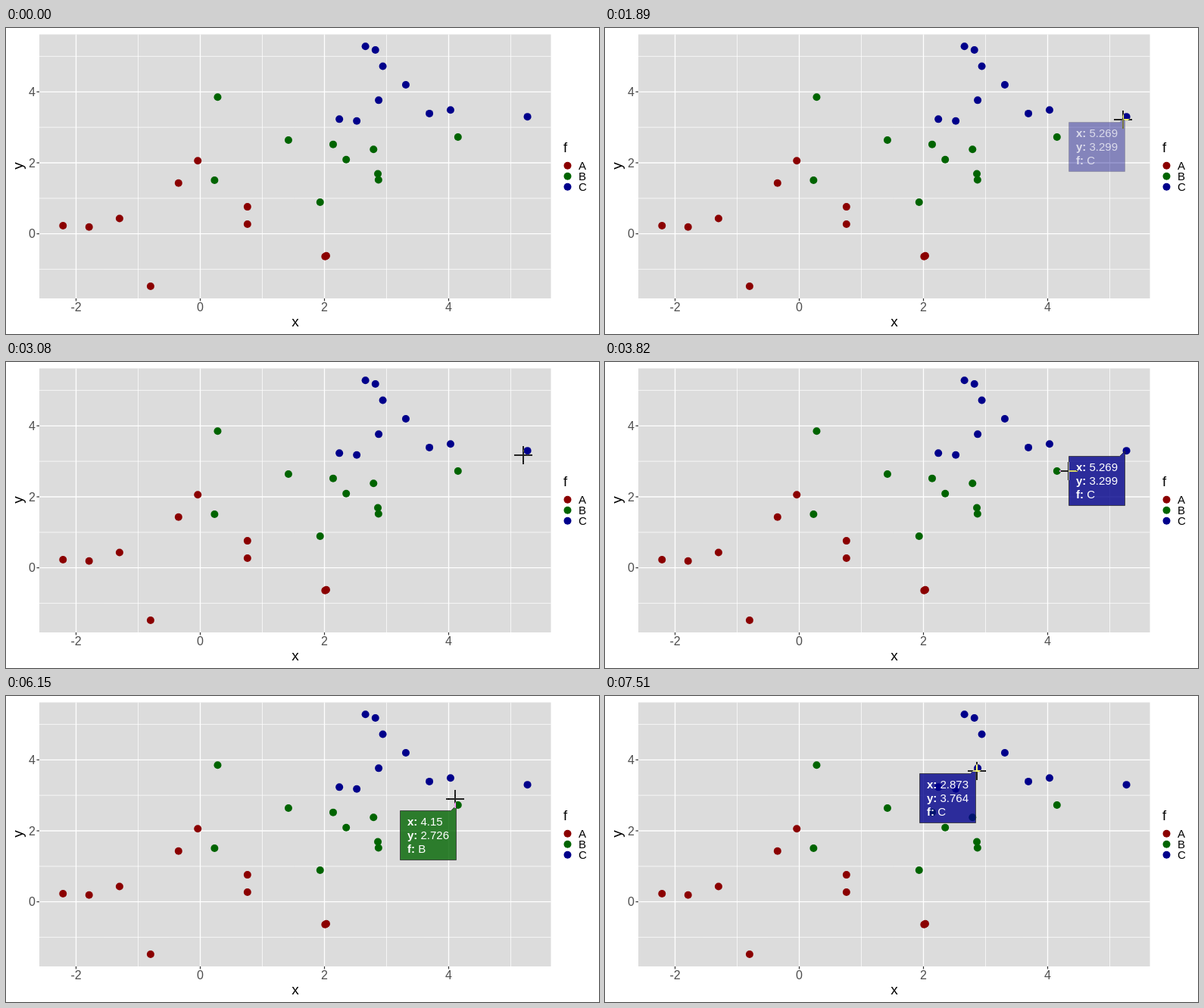
These frames come from a looping animation (783x404 px, 8 s). An HTML page with a canvas:

```html
<!DOCTYPE html>
<html lang="en">
<head>
<meta charset="utf-8">
<title>Scatter plot with tooltips</title>
<style>
html, body { margin: 0; width: 783px; height: 404px; overflow: hidden; background: #fff; }
canvas { display: block; }
</style>
</head>
<body>
<canvas id="stage" width="783" height="404"></canvas>
<script>
const ctx = document.getElementById('stage').getContext('2d');
const LOOP = 8000;
const FONT = '"Liberation Sans", Arial, sans-serif';
const COLORS = { A: '#8b0000', B: '#006400', C: '#00008b' };
const PANEL = { left: 44, right: 719.5, top: 8.5, bottom: 357 };

const scaleX = v => 256.5 + 82 * v;
const scaleY = v => 271.7 - 46.85 * v;

// The plotted observations
const data = {
  A: [[-2.21, .23], [-1.79, .19], [-1.3, .43], [-.8, -1.48], [-.35, 1.43],
      [-.04, 2.06], [.76, .76], [.76, .27], [2.01, -.64], [2.03, -.62]],
  B: [[.28, 3.85], [.23, 1.51], [1.42, 2.64], [2.14, 2.52], [2.35, 2.09],
      [2.79, 2.38], [2.86, 1.69], [2.87, 1.52], [1.93, .89], [4.15, 2.726]],
  C: [[2.66, 5.28], [2.82, 5.18], [2.94, 4.72], [3.31, 4.2], [2.24, 3.23],
      [2.52, 3.18], [3.69, 3.39], [4.03, 3.49], [2.873, 3.764], [5.269, 3.299]]
};

const hovers = [
  { group: 'C', item: 9, on: 1890, off: 2430 },
  { group: 'C', item: 9, on: 3280, off: 4690 },
  { group: 'B', item: 9, on: 4890, off: 7300 },
  { group: 'C', item: 8, on: 7430, off: LOOP }
];

// Each move eases on from where the one before it stopped
const entry = { x: 634, y: 372 };
const moves = [
  { start: 480, end: 1220, x: 674, y: 128 },
  { start: 1290, end: 1430, x: 687, y: 121 },
  { start: 1890, end: 1890, x: 684, y: 121 },
  { start: 2750, end: 2750, x: 683, y: 123 },
  { start: 3150, end: 3820, x: 612, y: 144 },
  { start: 3890, end: 4360, x: 595, y: 137 },
  { start: 6100, end: 6770, x: 488, y: 96 },
  { start: 6970, end: 6970, x: 491, y: 99 }
];

const ease = p => p * p * (3 - 2 * p);

function text(str, x, y, size, color, align = 'left', weight = '') {
  ctx.font = `${weight} ${size}px ${FONT}`;
  ctx.textAlign = align;
  ctx.fillStyle = color;
  ctx.fillText(str, x, y);
}

function line(x1, y1, x2, y2, width, color) {
  ctx.lineWidth = width;
  ctx.strokeStyle = color;
  ctx.beginPath();
  ctx.moveTo(x1, y1);
  ctx.lineTo(x2, y2);
  ctx.stroke();
}

function dot(x, y, color) {
  ctx.fillStyle = color;
  ctx.beginPath();
  ctx.arc(x, y, 5, 0, 2 * Math.PI);
  ctx.fill();
}

function drawPlot() {
  const { left, right, top, bottom } = PANEL;
  ctx.fillStyle = '#fff';
  ctx.fillRect(0, 0, 783, 404);
  ctx.fillStyle = '#dcdcdc';
  ctx.fillRect(left, top, right - left, bottom - top);

  for (let v = -2; v <= 5; v++) {
    const major = v % 2 === 0, width = major ? 1.3 : .7;
    const x = scaleX(v), y = scaleY(v);
    line(x, top, x, bottom, width, '#fff');
    if (v > -2) line(left, y, right, y, width, '#fff');
    if (!major) continue;
    line(x, bottom, x, bottom + 3.5, 1.2, '#333');
    text(v, x, 374, 16, '#4d4d4d', 'center');
    if (v >= 0) {
      line(left - 3.5, y, left, y, 1.2, '#333');
      text(v, 39, y + 5.6, 16, '#4d4d4d', 'right');
    }
  }

  text('x', 382, 394, 19, '#000', 'center');
  ctx.save();
  ctx.translate(22, 182);
  ctx.rotate(-Math.PI / 2);
  text('y', 0, 0, 19, '#000', 'center');
  ctx.restore();

  text('f', 736, 164, 18.5, '#000');
  Object.keys(COLORS).forEach((group, i) => {
    const y = 181.7 + 14 * i;
    dot(741.5, y, COLORS[group]);
    text(group, 756, y + 5.3, 15, '#000');
    data[group].forEach(([vx, vy]) => dot(scaleX(vx), scaleY(vy), COLORS[group]));
  });
}

function drawTooltip({ group, item, on, off }, t) {
  if (t < on || t >= off) return;
  const alpha = t < on + 75 ? .5 : 1;
  const [vx, vy] = data[group][item];
  const x = Math.floor(scaleX(vx) - 1.5), y = Math.round(scaleY(vy));
  const left = x - 74.5, right = x - .5, top = y + 7.5, bottom = y + 72.5;

  ctx.beginPath();
  ctx.moveTo(left, top);
  ctx.lineTo(right - 7, top);
  ctx.lineTo(right, y + .5);
  ctx.lineTo(right, bottom);
  ctx.lineTo(left, bottom);
  ctx.closePath();
  ctx.globalAlpha = .8 * alpha;
  ctx.fillStyle = COLORS[group];
  ctx.fill();
  ctx.globalAlpha = .8 * alpha * alpha;
  ctx.lineWidth = 1;
  ctx.strokeStyle = '#333';
  ctx.stroke();

  // The text comes in ahead of the box
  ctx.globalAlpha = Math.sqrt(alpha);
  Object.entries({ x: vx, y: vy, f: group }).forEach(([name, value], i) => {
    const label = name + ':', baseline = y + 27 + 18 * i;
    text(label, x - 65, baseline, 15, '#fff', 'left', 'bold');
    const width = ctx.measureText(label).width;
    text(' ' + value, x - 65 + width, baseline, 15, '#fff');
  });
  ctx.globalAlpha = 1;
}

// The crosshair inverts whatever lies under it
function drawCursor(t) {
  const i = moves.findLastIndex(move => move.start <= t);
  if (i < 0) return;
  const from = moves[i - 1] || entry, to = moves[i];
  const p = t < to.end ? ease((t - to.start) / (to.end - to.start)) : 1;
  const x = Math.round(from.x + (to.x - from.x) * p);
  const y = Math.round(from.y + (to.y - from.y) * p);
  ctx.globalCompositeOperation = 'difference';
  ctx.fillStyle = '#fff';
  ctx.beginPath();
  ctx.rect(x - 12, y - 1, 24, 2);
  ctx.rect(x - 1, y - 12, 2, 24);
  ctx.fill();
  ctx.globalCompositeOperation = 'source-over';
}

function frame() {
  const t = performance.now() % LOOP;
  drawPlot();
  hovers.forEach(hover => drawTooltip(hover, t));
  drawCursor(t);
  requestAnimationFrame(frame);
}
frame();
</script>
</body>
</html>
```
